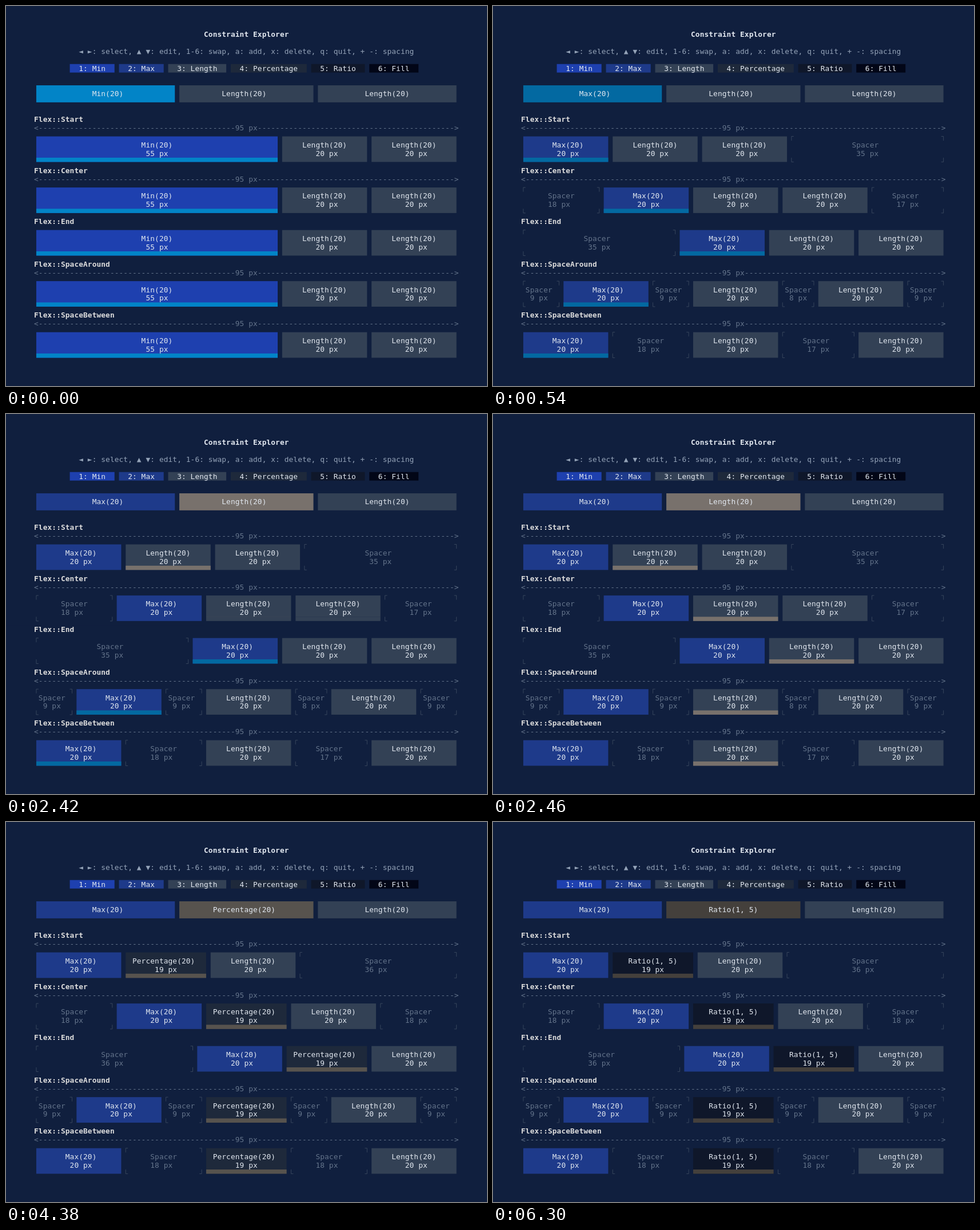
Animation, 841 px wide and 666 px high, one loop 8 s. Source, as an HTML page with a canvas:

```html
<!DOCTYPE html>
<html lang="en">
<head>
<meta charset="utf-8">
<title>Constraint Explorer</title>
<style>
  html, body { margin: 0; width: 100%; height: 100%; overflow: hidden; background: #101f3e; }
  canvas { display: block; }
</style>
</head>
<body>
<canvas id="stage" width="841" height="666"></canvas>
<script>
const ctx = document.getElementById('stage').getContext('2d');

// Terminal grid: cells of 11 x 21 units, scaled down to the stage.
const CELL_W = 11, CELL_H = 21, COLS = 95, SCALE = 0.7105;
const ORIGIN_X = 49.05, ORIGIN_Y = 42.04;
const FONT = '18px "DejaVu Sans Mono", monospace';
const BASELINE = 16.75;

const BACKGROUND = '#101f3e';
const TEXT = '#e2e8f0', TITLE = '#dddddd', HELP = '#94a3b8', DIM = '#64748b', CORNER = '#475569';
const FILL = {
  Min: '#1e40af', Max: '#1e3a8a', Length: '#334155',
  Percentage: '#1e293b', Ratio: '#0f172a', Fill: '#020617'
};
const SELECTED = {
  Min: '#0284c7', Max: '#0369a1', Length: '#78716c', Percentage: '#57534e', Ratio: '#44403c'
};

// gaps: share of the free space before, between and after the blocks.
const LAYOUTS = [
  { name: 'Start', row: 10, axis: true, gaps: [0, 0, 0, 1] },
  { name: 'Center', row: 16, axis: true, gaps: [1, 0, 0, 1] },
  { name: 'End', row: 22, axis: false, gaps: [1, 0, 0, 0] },
  { name: 'SpaceAround', row: 27, axis: true, gaps: [1, 1, 1, 1] },
  { name: 'SpaceBetween', row: 33, axis: true, gaps: [0, 1, 1, 0] }
];

const withMiddle = kind => ({ kinds: ['Max', kind, 'Length'], selected: 1 });
const minFirst = { kinds: ['Min', 'Length', 'Length'], selected: 0 };
const maxFirst = { kinds: ['Max', 'Length', 'Length'], selected: 0 };
const lengthMiddle = withMiddle('Length');

// A step with `cut` is a repaint that has only reached that cell.
const LOOP = 8000;
const STEPS = [
  { at: 0, screen: minFirst },
  { at: 500, screen: maxFirst, previous: minFirst, cut: { row: 30, col: 87 } },
  { at: 540, screen: maxFirst },
  { at: 2420, screen: lengthMiddle, previous: maxFirst, cut: { row: 21, col: 38 } },
  { at: 2460, screen: lengthMiddle },
  { at: 4380, screen: withMiddle('Percentage') },
  { at: 6300, screen: withMiddle('Ratio') }
];

function rect(col, row, width, height, color) {
  ctx.fillStyle = color;
  ctx.fillRect(col * CELL_W, row * CELL_H, width * CELL_W, height * CELL_H);
}

function print(text, col, row, color, bold = false) {
  ctx.font = (bold ? 'bold ' : '') + FONT;
  ctx.fillStyle = color;
  [...text].forEach((char, i) => {
    if (char !== ' ') ctx.fillText(char, (col + i) * CELL_W, row * CELL_H + BASELINE);
  });
}

const label = kind => kind === 'Ratio' ? 'Ratio(1, 5)' : kind + '(20)';

const blockText = (text, col, row, width) =>
  print(text, col + (width >> 1) - (text.length >> 1), row, TEXT);

const spacerText = (text, col, row, width) =>
  print(text, col + ((width - text.length) >> 1), row, DIM);

function drawBlock(kind, col, row, width, selected) {
  rect(col + 0.5, row + 0.5, width - 1, 3, FILL[kind]);
  if (selected) rect(col + 0.5, row + 3, width - 1, 0.5, SELECTED[kind]);
  blockText(label(kind), col, row + 1, width);
  blockText(width + ' px', col, row + 2, width);
}

function drawSpacer(col, row, width) {
  ctx.strokeStyle = CORNER;
  ctx.lineWidth = 1;
  ctx.beginPath();
  for (const [cx, dx] of [[col + 0.5, 0.5], [col + width - 0.5, -0.5]]) {
    for (const [cy, dy] of [[row + 0.5, 0.5], [row + 3.5, -0.5]]) {
      ctx.moveTo((cx + dx) * CELL_W, cy * CELL_H);
      ctx.lineTo(cx * CELL_W, cy * CELL_H);
      ctx.lineTo(cx * CELL_W, (cy + dy) * CELL_H);
    }
  }
  ctx.stroke();
  spacerText('Spacer', col, row + 1, width);
  spacerText(width + ' px', col, row + 2, width);
}

function blockWidths(kinds) {
  const widths = kinds.map(kind => kind === 'Percentage' || kind === 'Ratio' ? 19 : 20);
  if (kinds[0] === 'Min') widths[0] = COLS - widths[1] - widths[2];
  return widths;
}

function drawLayout({ name, row, axis, gaps }, { kinds, selected }) {
  print('Flex::' + name, 0, row, TITLE, true);
  const dashes = '-'.repeat(44);
  if (axis) print('<' + dashes + '95 px' + dashes + '>', 0, row + 1, DIM);

  const top = row + (axis ? 2 : 1);
  const widths = blockWidths(kinds);
  const free = COLS - widths.reduce((a, b) => a + b);
  const total = gaps.reduce((a, b) => a + b);
  let col = 0, share = 0, used = 0;
  gaps.forEach((gap, i) => {
    share += gap;
    const space = Math.round(free * share / total) - used;
    if (space) drawSpacer(col, top, space);
    used += space;
    col += space;
    if (i < kinds.length) {
      drawBlock(kinds[i], col, top, widths[i], i === selected);
      col += widths[i];
    }
  });
}

function drawHeader({ kinds, selected }) {
  print('Constraint Explorer', 38, 0, TEXT, true);
  print('◄ ►: select, ▲ ▼: edit, 1-6: swap, a: add, x: delete, q: quit, + -: spacing', 10, 2, HELP);

  let col = 8;
  Object.keys(FILL).forEach((kind, i) => {
    const text = `${i + 1}: ${kind}`;
    rect(col, 4, text.length + 4, 1, FILL[kind]);
    print(text, col + 2, 4, TEXT);
    col += text.length + 5;
  });

  col = 0;
  kinds.forEach((kind, i) => {
    const width = i === 1 ? 31 : 32;
    rect(col + 0.5, 6.5, width - 1, 2, (i === selected ? SELECTED : FILL)[kind]);
    blockText(label(kind), col, 7, width);
    col += width;
  });
}

function drawScreen(screen) {
  rect(-10, -4, 130, 60, BACKGROUND);
  drawHeader(screen);
  LAYOUTS.forEach(layout => drawLayout(layout, screen));
}

function drawStep({ screen, previous, cut }) {
  ctx.setTransform(SCALE, 0, 0, SCALE, ORIGIN_X, ORIGIN_Y);
  ctx.save();
  if (previous) {
    drawScreen(previous);
    ctx.beginPath();
    ctx.rect(-10 * CELL_W, -4 * CELL_H, 130 * CELL_W, (cut.row + 4) * CELL_H);
    ctx.rect(-10 * CELL_W, cut.row * CELL_H, (cut.col + 10) * CELL_W, CELL_H);
    ctx.clip();
  }
  drawScreen(screen);
  ctx.restore();
}

let shown = null;
function tick() {
  const time = performance.now() % LOOP;
  const step = STEPS.filter(({ at }) => at <= time).pop();
  if (step !== shown) drawStep(shown = step);
  requestAnimationFrame(tick);
}
tick();
</script>
</body>
</html>
```
